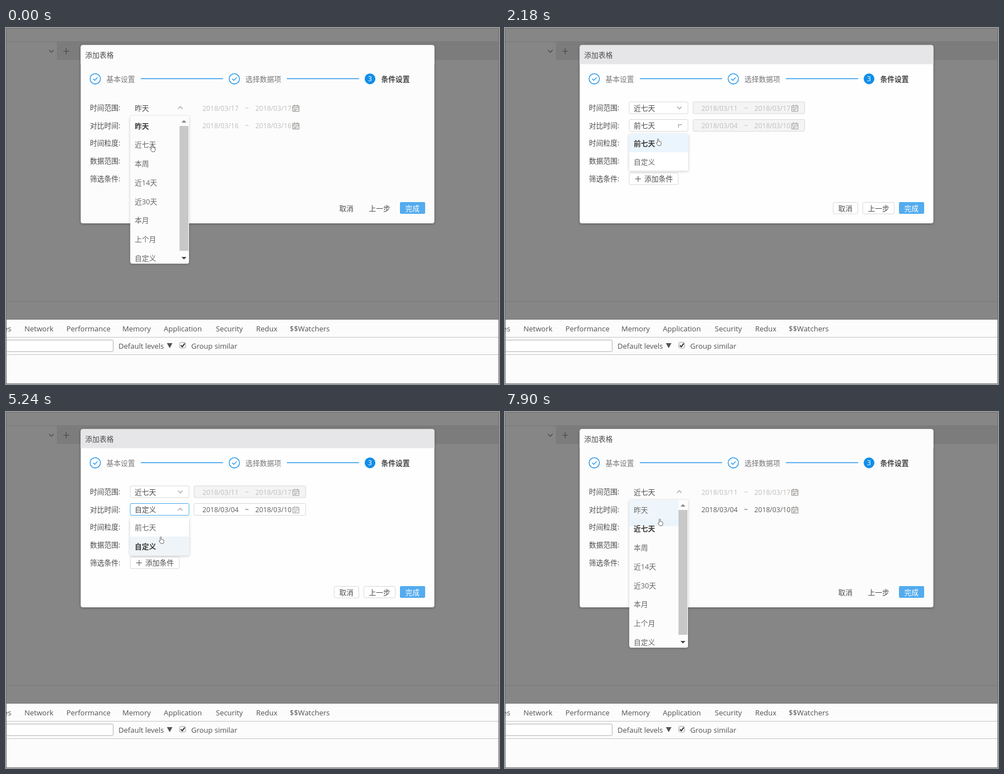
Animation, 881 px wide and 636 px high, one loop 8000 ms. Source, as an HTML page:

```html
<!DOCTYPE html>
<html lang="zh-CN">
<head>
<meta charset="utf-8">
<title>添加表格</title>
<style>
html, body { margin: 0; width: 100%; height: 100%; overflow: hidden; background: #858685; }
svg { display: block; }
text { font: 12.75px "Open Sans", "Noto Sans CJK SC", "Noto Sans CJK JP", sans-serif; fill: #4d4d4d; white-space: pre; }
.dev { font-size: 13px; fill: #505050; }
.bold { font-weight: 700; fill: #444; }
.step { font-weight: 500; fill: #777; }
.item { fill: #666; }
.item.sel { font-weight: 700; fill: #3c3c3c; }
.date { font-size: 12.2px; fill: #bfbfbf; }
.mid .date { fill: #999; }
.on .date { fill: #5c5c5c; }
.box { fill: #fff; stroke: #d9d9d9; }
.off .box { fill: #f4f4f4; }
.focus .box { stroke: #49a9ee; }
.hint { fill: #bfbfbf; }
.icon { fill: none; stroke: #929292; }
.flat .icon { stroke: #79756e; }
.flat .head { fill: #fcfcfc; }
.flat .panel { fill: #fcfcfc; }
.flat .box { fill: none; stroke: none; }
.flat .focus .box { stroke: #49a9ee; }
.flat .track { fill: #fcfcfc; }
.flat .thumb { fill: #c8c8c8; }
.panel { fill: #fefefe; }
.track { fill: #f1f1f1; }
.thumb { fill: #bdbdbd; }
.blue { fill: none; stroke: #108ee9; stroke-width: 1.3; }
.chev { fill: none; stroke: #999; stroke-width: 1.1; }
.soft { filter: drop-shadow(0 1px 2px rgba(0, 0, 0, .22)); }
</style>
</head>
<body>
<script>
const LOOP = 8000;
const rect = (x, y, w, h, a = '') => `<rect x="${x}" y="${y}" width="${w}" height="${h}" ${a}/>`;
const fill = (x, y, w, h, c) => rect(x, y, w, h, `fill="${c}"`);
const text = (x, y, s, c = '', id = '') => `<text x="${x}" y="${y}" class="${c}" id="${id}">${s}</text>`;
const path = (d, a) => `<path d="${d}" ${a}/>`;
const line = (d, c, w = 1) => path(d, `fill="none" stroke="${c}" stroke-width="${w}"`);
const box = (x, y, w, h = 21) => rect(x + .5, y - .5, w, h, 'class="box" rx="2"');

const select = (id, y, value, cls = '') => `<g id="${id}">${box(221.5, y, 105)}
  ${text(230, y + 15, value, cls, id + 'v')}
  <g transform="translate(311.5 ${y + 10})">${path('M-4 -2L0 2.2L4 -2', `class="chev" id="${id}c"`)}</g></g>`;

const dates = (id, y) => `<g id="${id}" class="off">${box(335.5, y, 199.5)}
  ${text(351, y + 15.3, '', 'date', id + 'a')}${text(427, y + 15.3, '~', 'date')}${text(445.5, y + 15.3, '', 'date', id + 'b')}
  ${path(`M512.5 ${y + 6.5}h11v10h-11zM512.5 ${y + 9.5}h11M515.5 ${y + 4.5}v3M520.5 ${y + 4.5}v3M514.5 ${y + 12.5}h7M514.5 ${y + 14.5}h4`, 'class="icon" stroke-width=".9"')}</g>`;

const doneStep = x => `<circle cx="${x}" cy="90.8" r="9.2" class="blue"/>${path(`M${x - 3.6} 90.8l2.8 2.8l4.8-5.2`, 'class="blue"')}`;
const button = (x, w, tx, s) => box(x, 312, w, 20.5) + text(tx, 327.3, s);

const backdrop = () => fill(0, 0, 881, 636, '#858685') + fill(91, 25, 790, 32, '#7c7c7c')
  + line('M0 24.5H881M0 488.5H881', '#777') + line('M77 39.5L81 43.5L85 39.5M102.500 41.500H113M107.5 36V47', '#444', 1.1);

const devtools = () => {
  const tabs = [[-4, 'es'], [33, 'Network'], [108, 'Performance'], [208, 'Memory'], [282, 'Application'],
    [375, 'Security'], [447, 'Redux'], [507, '$$Watchers']];
  return fill(0, 520, 881, 116, '#fcfcfc') + line('M0 520.5H881', '#777') + line('M0 552.5H881M0 583.5H881', '#c4c4c4')
    + tabs.map(([x, s]) => text(x, 542, s, 'dev')).join('')
    + rect(-5, 557.5, 196.500, 20.5, 'fill="#fff" stroke="#b0b0b0" rx="2"')
    + text(201, 573, 'Default levels', 'dev') + path('M287.500 563H297.500L292.500 572Z', 'fill="#555"')
    + rect(310.5, 561.5, 10.5, 10.5, 'fill="#f2f2f2" stroke="#aaa" rx="2"') + line('M312.5 567L315 569.500L319.500 563.5', '#333', 2)
    + text(331, 573, 'Group similar', 'dev') + rect(.5, .5, 880, 635, 'fill="none" stroke="#6f6f6f"');
};

const dialog = () => {
  const labels = ['时间范围:', '对比时间:', '时间粒度:', '数据范围:', '筛选条件:'];
  return rect(133.5, 30.5, 632, 318.5, 'rx="4" class="panel" style="filter:drop-shadow(0 1px 2px rgba(0,0,0,.35))"')
    + path('M133.5 64.5V34.5a4 4 0 0 1 4-4H761.5a4 4 0 0 1 4 4V64.5Z', 'class="head" fill="#e6e6e8"')
    + text(141.5, 52.5, '添加表格')
    + doneStep(159.5) + text(179.5, 96, '基本设置', 'step') + line('M241 90.5H388', '#2697ec', 1.4)
    + doneStep(408) + text(428, 96, '选择数据项', 'step') + line('M502 90.5H631', '#2697ec', 1.4)
    + '<circle cx="650.5" cy="90.8" r="9.6" fill="#108ee9"/><text x="650.5" y="95.3" text-anchor="middle" style="fill:#fff">3</text>'
    + text(670.5, 96, '条件设置', 'bold')
    + labels.map((s, i) => text(150, 147 + i * 31.65, s)).join('')
    + select('s1', 132.5, '') + dates('d1', 132.5) + select('s2', 164, '') + dates('d2', 164)
    + select('s3', 195.6, '天') + select('s4', 227.3, '请选择数...', 'hint')
    + box(221.5, 259.3, 87.5) + line('M232.500 269.500H243M237.8 264.3V274.8', '#555', 1.1) + text(249, 274.3, '添加条件')
    + button(586, 44, 595.5, '取消') + button(639, 56, 648.5, '上一步')
    + rect(704, 311, 45, 21, 'rx="2" fill="#54abee"') + '<text x="713.500" y="327.3" style="fill:#fff;font-weight:500">完成</text>';
};

const bigMenu = () => {
  const items = ['昨天', '近七天', '本周', '近14天', '近30天', '本月', '上个月', '自定义'];
  return `<clipPath id="clip">${rect(222, 157, 105, 264, 'rx="4"')}</clipPath><g id="big"><g class="soft"><g clip-path="url(#clip)">
    ${rect(222, 157, 105, 264, 'class="panel"')}
    ${rect(222, 157, 88, 33.7, 'id="h0"')}${rect(222, 190.7, 88, 33.7, 'id="h1"')}
    ${items.map((s, i) => text(230, 179.5 + i * 33.75, s, 'item')).join('')}
    ${rect(310, 157, 17, 264, 'class="track"')}${rect(310, 175, 16, 223, 'class="thumb"')}
    ${path('M313.5 169H322.5L318 164.5Z', 'fill="#8c8c8c"')}${path('M313.5 409H322.500L318 413.500Z', 'fill="#444"')}
  </g></g></g>`;
};

const smallMenu = () => `<g id="small"><g class="soft">${rect(221.5, 189, 106, 67.3, 'rx="4" fill="#fff"')}
  ${path('M221.5 222.6V193a4 4 0 0 1 4-4H323.500a4 4 0 0 1 4 4V222.6Z', 'id="p0"')}
  ${path('M221.5 222.600H327.5V252.3a4 4 0 0 1-4 4H225.500a4 4 0 0 1-4-4Z', 'id="p1"')}
  ${text(230, 211, '前七天', 'item')}${text(230, 244.500, '自定义', 'item')}</g></g>`;

const cursor = () => `<g id="cur">${path('M-2.500 1V-4.8a1.1 1.1 0 0 1 2.2 0V-1.5L3-.8Q4-.5 4 .8V3.500L3 6H-1.500L-4.500 1.8Q-4.500 .3-2.500 1Z', 'id="hand" fill="#fff" stroke="#555" stroke-width=".9"')}
  ${path('M-3.500 -4.500L2.500 1.500M-1 1.500v1.5M1 4.500v1.5', 'id="bit" fill="none" stroke="#777"')}</g>`;

document.body.innerHTML = `<svg id="stage" width="881" height="636" viewBox="0 0 881 636">
  ${backdrop()}${devtools()}${dialog()}${smallMenu()}${bigMenu()}${cursor()}</svg>`;

const $ = id => document.getElementById(id);
const WEEK = '近七天', PREV = '前七天', OWN = '自定义';
const BLUE = '#ebf5fd', PALE = '#f2f8fe', GREY = '#f3f3f3', NONE = 'none';

// Each step holds until the next; only the changed values are listed.
// big/small: [opacity, scaleY]; c1/c2: chevron angle; f: focused row; at: pointer
const steps = [
  [0, { flat: 1, v1: '昨天', v2: '前一天', from: [17, 16], to: [17, 16], d2: 'off', big: [1, 1], small: [0, 1], c1: 180, c2: 0,
    f: 0, bigSel: 0, hl: [NONE, NONE], ownSel: 0, rows: [BLUE, NONE], at: [262.5, 215], bit: 0 }],
  [140, { at: [262.5, 218.5] }],
  [680, { v1: WEEK, f: 1, c1: 165 }],
  [840, { flat: 0, v2: PREV, from: [11, '04'], to: [17, 10], c1: 38, big: [.93, 1], hl: [BLUE, '#f3f7fc'] }],
  [980, { c1: 0, big: [.5, .99] }],
  [1310, { big: [0, 1], at: [300.5, 182.5] }],
  [1490, { at: [296, 178] }],
  [2050, { f: 0, small: [.35, .87], c2: 60 }],
  [2180, { small: [1, .985], c2: 135, at: [275, 204] }],
  [2300, { small: [1, .992], c2: 180, f: 2, at: [276, 212] }],
  [2440, { at: [280, 226], rows: [BLUE, PALE] }],
  [2570, { at: [286, 219] }],
  [2720, { small: [1, 1] }],
  [2970, { v2: OWN }],
  [3110, { c2: 90, d2: 'mid', small: [.98, 1], bit: 1 }],
  [3270, { c2: 0, d2: 'on', small: [.4, .95], at: [300, 198], bit: 0 }],
  [3480, { small: [0, 1], at: [312.5, 176] }],
  [4190, { f: 0, c2: 60, small: [.92, .925], ownSel: 1, rows: [NONE, BLUE], bit: 1 }],
  [4310, { f: 2, c2: 180, small: [1, .985], at: [300, 190], bit: 0 }],
  [4500, { small: [1, 1], at: [286, 205] }],
  [4640, { at: [279, 209] }],
  [4850, { at: [278, 215] }],
  [4970, { at: [278, 222] }],
  [5100, { at: [278, 229] }],
  [5240, { rows: [NONE, '#eff4f8'] }],
  [5360, { rows: [NONE, GREY] }],
  [6100, { at: [288, 212] }],
  [6220, { at: [301, 193] }],
  [6340, { c2: 38, small: [.96, 1], at: [307, 185], bit: 1 }],
  [6590, { c2: 0, small: [0, 1], at: [314, 146], bit: 0 }],
  [6740, { at: [314, 143] }],
  [7480, { f: 1, c1: 135, big: [.8, .977], bigSel: 1, hl: [NONE, BLUE] }],
  [7630, { flat: 1, f: 0, c1: 180, big: [1, 1], hl: ['#eff6fb', '#ecf4fb'], at: [298, 168] }],
  [7900, { at: [278, 197] }],
];
let last = {};
const states = steps.map(([t, s]) => ({ t, ...(last = { ...last, ...s }) }));

const menu = (id, [o, k], y) => {
  const g = $(id);
  g.setAttribute('opacity', o);
  g.setAttribute('visibility', o ? 'visible' : 'hidden');
  g.setAttribute('transform', `translate(0 ${y}) scale(1 ${k}) translate(0 ${-y})`);
};
const pick = (id, n) => $(id).querySelectorAll('.item').forEach((el, i) => el.classList.toggle('sel', i === n));

function show(s) {
  $('stage').setAttribute('class', s.flat ? 'flat' : '');
  [1, 2].forEach(n => {
    $('s' + n + 'v').textContent = s['v' + n];
    $('s' + n + 'c').setAttribute('transform', `rotate(${s['c' + n]})`);
    $('s' + n).setAttribute('class', s.f === n ? 'focus' : '');
    $('d' + n + 'a').textContent = '2018/03/' + s.from[n - 1];
    $('d' + n + 'b').textContent = '2018/03/' + s.to[n - 1];
    $('h' + (n - 1)).setAttribute('fill', s.hl[n - 1]);
    $('p' + (n - 1)).setAttribute('fill', s.rows[n - 1]);
  });
  $('h1').setAttribute('height', s.flat ? 13.3 : 33.7);
  $('d2').setAttribute('class', s.d2);
  menu('big', s.big, 157);
  menu('small', s.small, 189);
  pick('big', s.bigSel);
  pick('small', s.ownSel);
  $('cur').setAttribute('transform', `translate(${s.at})`);
  $('hand').setAttribute('visibility', s.bit ? 'hidden' : 'visible');
  $('bit').setAttribute('visibility', s.bit ? 'visible' : 'hidden');
}

let shown;
function tick() {
  const t = performance.now() % LOOP;
  const s = states.findLast(e => e.t <= t);
  if (s !== shown) show(shown = s);
  requestAnimationFrame(tick);
}
tick();
</script>
</body>
</html>
```
